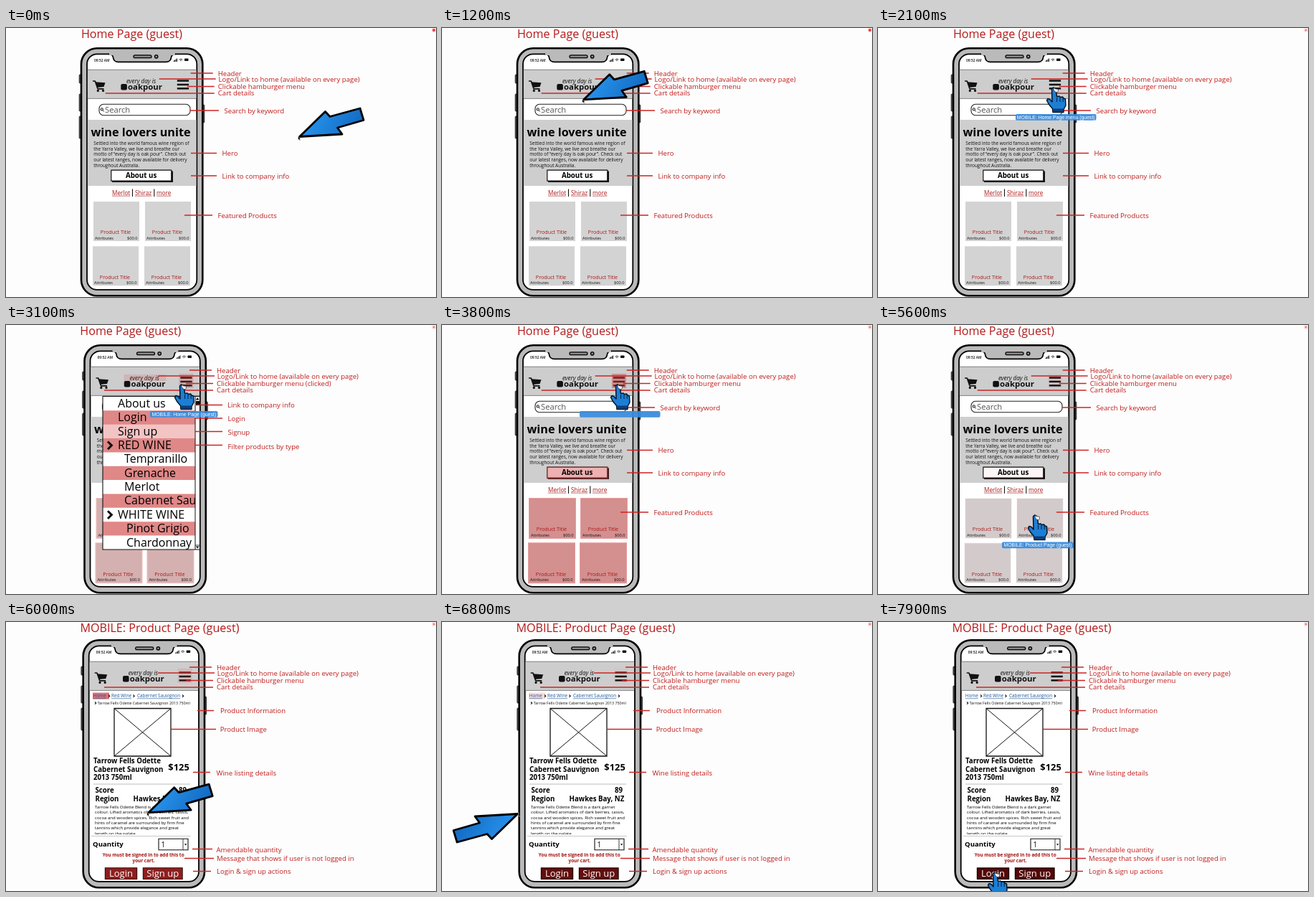
Animation of 600 by 375 pixels, one loop 8000 ms. Source, as an HTML page with a canvas:

```html
<!DOCTYPE html>
<html lang="en">
<head>
<meta charset="utf-8">
<title>Wireframe walkthrough</title>
<style>
html, body { margin: 0; width: 100%; height: 100%; overflow: hidden; background: #fdfdfd; }
canvas { display: block; width: 600px; height: 375px; }
</style>
</head>
<body>
<canvas id="stage" width="600" height="375"></canvas>
<script>
const c = document.getElementById('stage').getContext('2d');
const LOOP = 8000;
const SANS = '"Open Sans", "Noto Sans", sans-serif';
const RED = '#c01c1c', DARK = '#a81818', GREY = '#d3d3d3', INK = '#111', BEZEL = '#bababa';
const MENU_AT = 2600, HOME_AT = 3700, PRODUCT_AT = 5900;

const clamp = v => Math.max(0, Math.min(1, v));
const ease = v => v * v * (3 - 2 * v);

function text(s, x, y, size, color = INK, style = '', align = 'left') {
  c.font = `${style} ${size}px ${SANS}`;
  c.fillStyle = color;
  c.textAlign = align;
  c.fillText(s, x, y);
}

const title = (s, x) => text(s, x, 13.7, 16.1, '#b41a1a');

function linkText(s, x, y, size, color) {
  text(s, x, y, size, color);
  line(x, y + 1.4, x + c.measureText(s).width, y + 1.4, color, 0.6);
}

function line(x1, y1, x2, y2, color = INK, w = 1) {
  c.strokeStyle = color;
  c.lineWidth = w;
  c.beginPath();
  c.moveTo(x1, y1);
  c.lineTo(x2, y2);
  c.stroke();
}

function rect(x, y, w, h, fill, stroke, lw = 1, r = 0) {
  c.beginPath();
  c.roundRect(x, y, w, h, r);
  if (fill) { c.fillStyle = fill; c.fill(); }
  if (stroke) { c.strokeStyle = stroke; c.lineWidth = lw; c.stroke(); }
}

function poly(points, fill, stroke, lw) {
  c.beginPath();
  points.forEach(([x, y]) => c.lineTo(x, y));
  c.closePath();
  c.fillStyle = fill;
  c.fill();
  if (stroke) {
    c.strokeStyle = stroke;
    c.lineWidth = lw;
    c.lineJoin = 'round';
    c.stroke();
  }
}

function chevron(x, y, s, w) {
  c.strokeStyle = INK;
  c.lineWidth = w;
  c.lineJoin = 'miter';
  c.beginPath();
  c.moveTo(x, y - s);
  c.lineTo(x + s, y);
  c.lineTo(x, y + s);
  c.stroke();
}

function hot(x, y, w, h, alpha) {
  if (alpha > 0) rect(x, y, w, h, `rgba(214,60,60,${alpha})`);
}

// One callout: text, its left edge and middle, then the pointer line
function callout([s, x, mid, x1, x2, y]) {
  line(x1, y, x2, y, '#cc2424', 1.5);
  text(s, x, mid + 3.4, 9.65, RED);
}

function phone() {
  const side = (x, y, h) => rect(x, y, 2.6, h, '#555', INK, 0.8, 1);
  side(102.2, 65, 12);
  side(102.2, 92, 24);
  side(102.2, 123, 31);
  side(274.2, 107, 25);
  rect(105, 28.3, 169.3, 345, BEZEL, '#000', 2.6, 22);
  rect(113, 36.3, 153.3, 328.6, '#fff', '#000', 1.8, 14);
  // notch
  c.beginPath();
  c.moveTo(143, 36.3);
  c.quadraticCurveTo(149, 36.5, 149.5, 41);
  c.quadraticCurveTo(150, 47.3, 157, 47.3);
  c.lineTo(223, 47.3);
  c.quadraticCurveTo(230, 47.3, 230.5, 41);
  c.quadraticCurveTo(231, 36.5, 237, 36.3);
  c.fillStyle = BEZEL;
  c.fill();
  c.strokeStyle = '#000';
  c.lineWidth = 1.7;
  c.stroke();
  rect(144, 34, 92, 4, BEZEL);
  rect(178, 37.9, 25, 3.8, '#888', '#000', 1.3, 1.9);
  rect(207.5, 37.6, 4.4, 4.4, '#888', '#000', 1.3, 2.2);

  text('09:52 AM', 123, 47, 4.9, INK, '600');
  for (let i = 0; i < 4; i++) rect(233.5 + i * 1.5, 45.5 - i, 1, 1.5 + i, INK);
  c.strokeStyle = INK;
  c.lineWidth = 0.9;
  for (const r of [1.4, 3.2]) {
    c.beginPath();
    c.arc(244, 46.5, r, -2.4, -0.75);
    c.stroke();
  }
  rect(249, 42.5, 5.5, 3.6, INK, null, 0, 0.8);
}

function header(a) {
  rect(113.9, 58, 151.5, 40.3, '#cdcdcd');
  line(113.9, 58.2, 265.4, 58.2, '#777', 0.9);
  line(113.9, 98.4, 265.4, 98.4, '#777', 0.9);
  // cart
  c.strokeStyle = INK;
  c.lineWidth = 1.7;
  c.lineJoin = 'round';
  c.beginPath();
  c.moveTo(121, 74);
  c.lineTo(124.3, 74);
  c.lineTo(128, 84.8);
  c.lineTo(136.5, 84.8);
  c.stroke();
  poly([[124.6, 75.2], [138.5, 76.3], [136.5, 82], [127, 83]], INK);
  for (const x of [128.3, 135.5]) {
    c.beginPath();
    c.arc(x, 87.4, 1.6, 0, 7);
    c.fill();
  }
  text('every day is', 168, 76.6, 8.1, INK, 'italic');
  rect(160.3, 78, 8.6, 8.6, INK, null, 0, 2);
  text('oakpour', 170, 86, 11.4, INK, 'bold');
  for (let i = 0; i < 3; i++) rect(238.8, 72.3 + i * 5.4, 16.3, 2.5, INK);
  hot(237, 68, 20, 20, a);
}

function card(x, y, a) {
  rect(x, y, 64, 55, GREY);
  hot(x - 1, y - 1, 66, 57, a);
  if (a > 0.15) rect(x - 0.5, y - 0.5, 65, 56, null, `rgba(225,140,140,${a})`, 1);
  text('Product Title', x + 31, y + 45.3, 7.2, DARK, '', 'center');
  text('Attributes', x + 2, y + 52.7, 5.65);
  text('$00.0', x + 61.5, y + 52.7, 5.7, INK, '', 'right');
}

const intro = [
  'Settled into the world famous wine region of',
  'the Yarra Valley, we live and breathe our',
  'motto of “every day is oak pour”. Check out',
  'our latest ranges, now available for delivery',
  'throughout Australia.'
];

function homeScreen(a) {
  phone();
  header(a);
  rect(130, 106.3, 127, 15.4, '#fff', '#222', 1.1, 6);
  c.beginPath();
  c.arc(133.8, 113.4, 1.6, 0, 7);
  c.stroke();
  line(135, 114.7, 136.6, 116.5, '#222', 1);
  text('Search', 138, 117.5, 11.2, '#555');

  rect(113.9, 128, 151.5, 92, '#cecece');
  text('wine lovers unite', 118.5, 151, 16.2, '#000', 'bold');
  intro.forEach((s, i) => text(s, 122.3, 162.8 + i * 7.7, 6.45));
  rect(148, 199.5, 85, 15.5, INK);
  rect(146.8, 198.2, 84, 15, '#fff', INK, 1.2);
  hot(146, 197.5, 86.5, 17.5, a * 0.9);
  text('About us', 188.6, 209.4, 9.75, '#000', 'bold', 'center');

  linkText('Merlot', 148, 232.8, 8.2, DARK);
  linkText('Shiraz', 180, 232.8, 8.2, DARK);
  linkText('more', 210, 232.8, 8.2, DARK);
  for (const x of [176.5, 206.8]) line(x, 224.5, x, 235, INK, 1.1);
  card(122, 242, a);
  card(194, 242, a);
  card(121, 304.3, a);
  card(193, 304.3, a);
}

const topLabels = (x, suffix = '') => [
  ['Header', x, 64, x - 38, x - 7, 63],
  ['Logo/Link to home (available on every page)', x + 0.8, 72, x - 82, x - 3, 71],
  ['Clickable hamburger menu' + suffix, x, 82, x - 43, x - 5, 81.5],
  ['Cart details', x, 91, x - 157, x - 5, 91]
];

function homePage(a) {
  homeScreen(a);
  title('Home Page (guest)', 105);
  [...topLabels(295.7),
    ['Search by keyword', 304.5, 116, 257, 297, 115],
    ['Hero', 301.5, 174.5, 258, 294, 174.5],
    ['Link to company info', 301.5, 207, 258, 294, 206],
    ['Featured Products', 295.5, 261.5, 249, 288, 261]
  ].forEach(callout);
}

const rows = [
  ['About us', 156], ['Login', 156], ['Sign up', 156], ['RED WINE', 156],
  ['Tempranillo', 165], ['Grenache', 165], ['Merlot', 165],
  ['Cabernet Sauvignon', 165], ['WHITE WINE', 156],
  ['Pinot Grigio', 168], ['Chardonnay', 168]
];

function menuPage(a) {
  c.save();
  c.translate(4.5, 0);
  homeScreen(a * 0.7);
  hot(160, 69, 59, 9, a * 0.5);
  c.restore();

  rect(135, 99.5, 135.5, 213.5, '#fff');
  c.save();
  c.beginPath();
  c.rect(135, 99.5, 129, 213.5);
  c.clip();
  rows.forEach(([s, x], i) => {
    const y = 100 + i * 19.35;
    if (i % 2) rect(135, y, 129, 19.35, '#e08787');
    if (i === 2) hot(135, y, 129, 19.35, a * 0.9);
    text(s, x, y + 15, 16, '#000');
    if (x === 156 && i > 2) chevron(142, y + 9.8, 5.4, 3);
  });
  c.restore();
  rect(135, 99.5, 135.5, 213.5, null, INK, 1.1);
  line(264, 99.5, 264, 313, INK, 1);
  rect(265, 106, 5, 6, INK);
  poly([[267.2, 101], [269.6, 104.5], [264.8, 104.5]], INK);
  line(264, 307, 270.5, 307, INK, 0.8);
  poly([[267.2, 311.5], [269.6, 308.5], [264.8, 308.5]], INK);

  title('Home Page (guest)', 103.3);
  [...topLabels(294, ' (clicked)'),
    ['Link to company info', 309, 112, 266, 302, 111.5],
    ['Login', 309.5, 130.5, 264, 302, 130],
    ['Signup', 309.5, 149.5, 264, 302, 148.5],
    ['Filter products by type', 309.5, 169.5, 264, 302, 167.5]
  ].forEach(callout);
}

const wine = 'Tarrow Fells Odette';
const notes = [
  wine + ' Blend is a dark garnet',
  'colour. Lifted aromatics of dark berries, cassis,',
  'cocoa and wooden spices. Rich sweet fruit and',
  'hints of caramel are surrounded by firm fine',
  'tannins which provide elegance and great',
  'length on the palate.'
];

function button(s, x, w, a) {
  rect(x, 343, w, 15.4, '#560707', '#1c0000', 1.4);
  hot(x, 343, w, 15.4, a);
  text(s, x + w / 2, 355.3, 13, '#fff', '', 'center');
}

function productPage(a) {
  c.save();
  c.translate(2.7, -3);
  phone();
  header(a * 0.3);
  c.restore();

  hot(121, 98.5, 23, 9, a * 1.6);
  const blue = '#1c5599';
  linkText('Home', 121.7, 105.3, 6.4, blue);
  linkText('Red Wine', 147, 105.3, 6.4, blue);
  linkText('Cabernet Sauvignon', 183, 105.3, 6.4, blue);
  for (const x of [143, 177.5, 246]) chevron(x, 103.2, 1.7, 1.1);
  chevron(124, 113, 1.7, 1.1);
  text(wine + ' Cabernet Sauvignon 2013 750ml', 127.8, 115, 5.3);

  rect(151, 120.5, 79, 66.5, '#fff', INK, 1.3);
  line(151, 120.5, 230, 187, INK, 1);
  line(230, 120.5, 151, 187, INK, 1);
  [wine, 'Cabernet Sauvignon', '2013 750ml'].forEach((s, i) =>
    text(s, 122, 197.2 + i * 11.6, 9.7, '#000', 'bold'));
  text('$125', 255.8, 207.3, 12.9, '#000', 'bold', 'right');
  line(122, 226, 257, 226, '#aaa', 0.8);
  text('Score', 124.5, 238.3, 9.7, '#000', 'bold');
  text('89', 252, 238.3, 9.7, '#000', 'bold', 'right');
  text('Region', 124.5, 250, 9.7, '#000', 'bold');
  text('Hawkes Bay, NZ', 254.3, 250, 9.7, '#000', 'bold', 'right');

  c.save();
  c.beginPath();
  c.rect(117, 251, 150, 45.2);
  c.clip();
  notes.forEach((s, i) => text(s, 124, 259.9 + i * 7.35, 6.05, '#000'));
  c.restore();
  line(119, 298.5, 258, 298.5, '#bbb', 0.8);

  text('Quantity', 121, 312.8, 9.6, '#000', 'bold');
  rect(213, 302.3, 41, 15.5, '#fff', INK, 1.1);
  line(247, 302.3, 247, 317.8, INK, 0.8);
  poly([[248.9, 309.3], [252.4, 309.3], [250.6, 311.5]], INK);
  text('1', 216.5, 313.6, 10);
  text('You must be signed in to add this to', 191.7, 327.3, 6.4, '#a01212', 'bold', 'center');
  text('your cart.', 192, 335.3, 6.4, '#a01212', 'bold', 'center');
  button('Login', 138.5, 44, a);
  button('Sign up', 191.5, 54.5, a);

  title('MOBILE: Product Page (guest)', 103.5);
  [...topLabels(294),
    ['Product Information', 299, 124, 267, 290, 123.5],
    ['Product Image', 298.7, 150, 230, 293, 149.5],
    ['Wine listing details', 293.5, 210.5, 261, 285, 209.5],
    ['Amendable quantity', 293.5, 317.5, 260, 288, 316.5],
    ['Message that shows if user is not logged in', 294, 330, 249, 290, 329.5],
    ['Login & sign up actions', 294, 348, 261, 286, 347.5]
  ].forEach(callout);
}

// time, x, y
const path = [
  [0, 408, 152], [250, 408, 152], [900, 262, 112], [1400, 161, 94],
  [1900, 246, 84], [4300, 246, 84], [5200, 220, 266], [5900, 220, 266],
  [6250, 107, 267], [7150, 107, 267], [7800, 164, 350], [LOOP, 164, 350]
];

function pointerAt(t) {
  const i = path.findIndex((p, n) => n && t < p[0]);
  const [t0, x0, y0] = path[i - 1], [t1, x1, y1] = path[i];
  const k = ease((t - t0) / (t1 - t0));
  return [x0 + (x1 - x0) * k, y0 + (y1 - y0) * k];
}

function arrow() {
  const g = c.createLinearGradient(20, -35, 75, -5);
  g.addColorStop(0, '#2792ec');
  g.addColorStop(1, '#146dc4');
  poly([[1.5, -0.5], [37.5, -35.5], [44, -28.5], [86, -40], [91, -23.5], [54.5, -13], [61, -4]],
    g, '#000', 2.8);
}

function hand() {
  poly([[-3.5, 1], [-1.5, -1], [1, 0], [2.5, 4], [3.5, 11.5], [7, 11], [8.5, 12.5], [11.5, 12],
    [13, 14], [15.5, 15], [16, 24], [13, 29.5], [13, 33.5], [-2, 33.5], [-2.5, 28.5],
    [-7.5, 22.5], [-10.5, 17], [-9, 14.5], [-6, 15.5], [-3, 19]], '#1c7fd6', '#071527', 1.5);
  rect(-1.5, 28.5, 14, 4.6, '#0c3d78');
  for (const x of [3.6, 8, 12.2]) line(x, 13, x, 19, '#071527', 0.9);
  poly([[0, -1], [1.5, 1], [5, 1], [5.5, 4], [4, 6], [1, 5], [-1, 2]], '#fff', '#222', 0.7);
}

function pointer(t) {
  const pressing = (t >= 1850 && t < 4350) || (t >= 5100 && t < 5930) || t >= 7680;
  const toRight = (t >= 1400 && t < 4300) || t >= 6260;
  const [x, y] = pointerAt(t);
  c.save();
  c.translate(x, y);
  if (pressing) hand();
  else {
    c.save();
    if (toRight) c.rotate(Math.PI);
    arrow();
    c.restore();
    poly([[-0.5, -1], [-0.5, 4], [0.8, 3], [1.8, 5], [2.7, 4.5], [1.8, 2.7], [3.2, 2.5]], '#000', '#fff', 0.4);
  }
  c.restore();
}

// start, end, label, x, y, width, time the label shows
const tips = [
  [1950, MENU_AT, 'MOBILE: Home Page menu (guest)', 192, 120, 112.5, 1950],
  [MENU_AT, HOME_AT, 'MOBILE: Home Page (guest)', 201, 120, 94.5, MENU_AT],
  [HOME_AT, 4300, 'MOBILE: Home Page menu (guest)', 192, 120, 112.5, 3900],
  [5200, PRODUCT_AT, 'MOBILE: Product Page (guest)', 173, 302.5, 100, 5200]
];

function tooltip(t) {
  for (const [from, to, s, x, y, w, shown] of tips) {
    if (t < from || t >= to) continue;
    rect(x, y, w, 8.8, 'rgba(58,140,220,0.94)', null, 0, 2);
    if (t < shown) continue;
    c.font = '6.9px "Liberation Sans", Arial, sans-serif';
    c.fillStyle = '#fff';
    c.textAlign = 'center';
    c.fillText(s, x + w / 2, y + 6.8);
  }
}

const flash = dt => 0.45 * (1 - clamp((dt - 300) / 800));

function draw(t) {
  rect(0, 0, 600, 375, '#fdfdfd');
  if (t < MENU_AT) homePage(0);
  else if (t < HOME_AT) menuPage(flash(t - MENU_AT));
  else if (t < PRODUCT_AT) homePage(Math.max(0.05, flash(t - HOME_AT)));
  else productPage(flash(t - PRODUCT_AT));
  pointer(t);
  tooltip(t);

  const lit = t < 1400;
  c.beginPath();
  c.arc(597, 3, 3, 0, 7);
  c.fillStyle = '#fbdcdc';
  c.fill();
  c.beginPath();
  c.arc(597, 3, lit ? 2 : 1.3, 0, 7);
  c.fillStyle = lit ? '#f03a3a' : '#ee7474';
  c.fill();
}

function tick() {
  draw(performance.now() % LOOP);
  requestAnimationFrame(tick);
}
tick();
</script>
</body>
</html>
```
